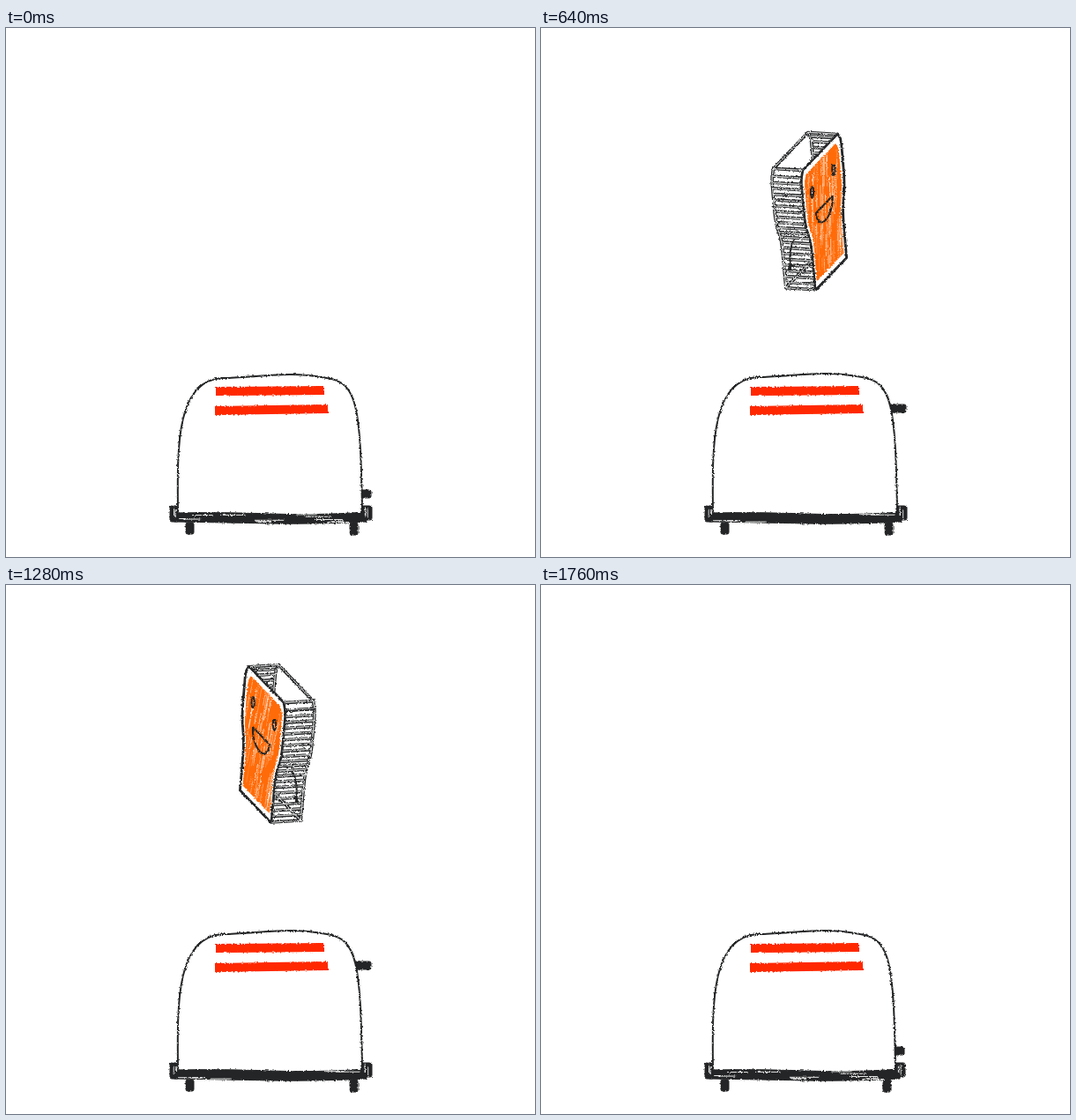
Write an HTML page that moves like this. It is 600 by 600 pixels and loops after 1.92 s.

```html
<!DOCTYPE html>
<html>
<head>
<meta charset="utf-8">
<title>Toaster</title>
<style>
  html, body { margin: 0; width: 100%; height: 100%; overflow: hidden; background: #fff; }
  svg { display: block; width: 100%; height: 100%; }
  path { fill: none; stroke-linecap: round; stroke-linejoin: round; }
  .ink { stroke: #242526; stroke-width: 2; }
  .shell { fill: #fff; }
  .solid { fill: #242526; stroke: #242526; }
  .halo { stroke: #242526; stroke-width: 3.6; }
  .bread { fill: #fff; stroke: #fff; stroke-width: .6; }
  .red { stroke: #ff2800; stroke-linecap: butt; }
  .jam { fill: #ff6b08; stroke: #ff6b08; stroke-width: 1.5; }
  .gap { stroke: #fff; }
</style>
</head>
<body>
<svg viewBox="0 0 600 600">
  <filter id="crayon" filterUnits="userSpaceOnUse" x="0" y="0" width="600" height="600" color-interpolation-filters="sRGB">
    <feTurbulence type="fractalNoise" baseFrequency=".45" numOctaves="2" seed="4"/>
    <feDisplacementMap in="SourceGraphic" scale="3" xChannelSelector="R" yChannelSelector="G"/>
  </filter>
  <clipPath id="aboveSlot"><path d="M0 0H600V431H0Z"/></clipPath>
  <g id="scene" filter="url(#crayon)"></g>
</svg>
<script>
const LOOP = 1920, STEP = 80;
const POP = 480, LAND = 1440, PRESS = 1600;
const { PI, sin, cos, tanh, abs, min, max, sign } = Math;

const range = (count, rule) => Array.from({ length: count }, (_, i) => rule(i));
const path = (d, cls = 'ink', extra = '') => `<path class="${cls}" d="${d}" ${extra}/>`;
const rect = (x, y, w, h) => `<rect class="solid" x="${x}" y="${y}" width="${w}" height="${h}" rx="2"/>`;
const polygon = pts => 'M' + pts.map(p => p.map(n => n.toFixed(1))).join('L') + 'Z';
const rotate = (a, b, angle) => [a * cos(angle) - b * sin(angle), a * sin(angle) + b * cos(angle)];

function randomizer(seed) {
  return () => (seed = seed * 16807 % 2147483647) / 2147483647;
}

// Bread model: u runs right, v down, w out of the jam side
const HALF_HEIGHT = 74, HALF_DEPTH = 18, PITCH = 21 * PI / 180;

function halfWidth(v) {
  const corner = max(0, (-v - 60) / 14);
  return (57 - 7 * tanh((v - 3) / 14)) * (1 - 0.12 * corner ** 2);
}

const rightSide = range(22, i => {
  const v = -HALF_HEIGHT + i * 2 * HALF_HEIGHT / 21;
  return [halfWidth(v), v];
});
const profile = [...rightSide, ...rightSide.map(([u, v]) => [-u, v]).reverse()];

const ellipse = (x, y, rx, ry, sweep = 2 * PI) =>
  range(19, i => [x + rx * cos(i / 18 * sweep), y + ry * sin(i / 18 * sweep)]);
const eyes = [-35, 35].map(x => ellipse(x, -39, 4.5, 6.3));
const smile = ellipse(-2, -11, 27, 19, PI);
const gasp = ellipse(3, 3, 12, 5);

function flight(time) {
  const p = (time - POP) / (LAND - POP);
  return {
    x: 306,
    y: min(425, 117 + 2080 * abs(p - 0.52) ** 3),
    yaw: (360 * p - 10 + 10 * sin(3 * PI * p) + 9 * sin(2 * PI * p)) * PI / 180,
    roll: -7 * sin(1.5 * PI * p) * PI / 180,
    shy: p <= 0,
    cheering: p >= 1
  };
}

function drawToast({ x, y, yaw, roll, shy, cheering }) {
  const depth = (u, w) => w * cos(yaw) - u * sin(yaw);
  const project = (u, v, w) => {
    const across = u * cos(yaw) + w * sin(yaw);
    const [px, py] = rotate(across, v * cos(PITCH) + depth(u, w) * sin(PITCH), roll);
    return [x + px, y + py];
  };
  const facing = sign(cos(yaw)), near = HALF_DEPTH * facing;
  const outline = (shape, w) => polygon(shape.map(([u, v]) => project(u, v, w)));
  const stroke = pts => 'M' + pts.map(p => project(...p)).join('L');

  const crust = profile.map(([u, v], i) => {
    const [u2, v2] = profile[(i + 1) % profile.length];
    return polygon([project(u, v, near), project(u2, v2, near), project(u2, v2, -near), project(u, v, -near)]);
  }).join('');
  const solid = outline(profile, -near) + crust + outline(profile, near);

  const jam = outline(profile.map(([u, v]) => [u * 0.84, v * 0.88]), near);
  const random = randomizer(977);
  const gaps = range(75, () => {
    const u = (random() - 0.5) * 110, v = (random() - 0.6) * 130, length = 10 + random() * 32;
    const width = (0.8 + random() * 2) * max(0.4, abs(cos(yaw)));
    return path(stroke([[u, v, near], [u - length * 0.2, v + length, near]]), 'gap',
      `stroke-width="${width}" opacity="${0.35 + random() * 0.5}"`);
  }).join('');

  // An arm leaves the crust sideways, bends, and ends in three fingers
  const arm = side => {
    const lift = cheering ? -28 : 22;
    const point = (out, v) => [side * (55 + out), v, 0];
    const limb = range(9, i => point(20 * sin(i / 8 * PI / 2), 12 + lift * (i / 8) ** 2));
    const fingers = [-6, 0, 6].map(spread =>
      stroke([point(20, 12 + lift), point(20 + spread, 12 + lift + sign(lift) * (7 - abs(spread) / 3))]));
    return path(stroke(limb) + fingers.join(''));
  };
  const arms = shy ? [] : [-1, 1];
  const isNear = side => depth(side * 60, 0) > 0;

  const corner = w => [facing * halfWidth(-66), -66, w];
  const crease = isNear(facing) ? path(stroke([corner(near), corner(-near)])) : '';
  const face = [...eyes, shy ? gasp : smile].map(shape => path(outline(shape, near))).join('');

  return arms.filter(s => !isNear(s)).map(arm).join('') +
    path(solid, 'halo') + path(solid, 'bread') + path(outline(profile, near)) + crease +
    `<clipPath id="jam">${path(jam)}</clipPath>` + path(jam, 'jam') +
    `<g clip-path="url(#jam)">${gaps}</g>` + (facing > 0 ? face : '') +
    arms.filter(isNear).map(arm).join('');
}

function drawToaster({ left = 195, right = 404, top = 397, slot = 412, lever = 524, widen = 1, worn = 12 }) {
  const body = `M${left} 549C${left - 1} 470 ${left - 1} 400 ${left + 50} ${top}
    C${left + 95} ${top} ${left + 120} ${top - 9} ${right - 40} ${top}
    C${right - 5} ${top + 5} ${right - 2} 430 ${right} 549`;
  const random = randomizer(613 + lever);
  const base = `M${left - 4} 550Q250 549 300 551T${right + 5} 549V560Q350 563 300 562T${left - 4} 560Z`;
  const scratches = range(worn, () =>
    path(`M${left + random() * 180} ${551.5 + random() * 9}h${8 + random() * 26}`, 'gap', 'stroke-width=".9"'));
  const capScratches = [left - 6, right + 3].flatMap(x =>
    range(3, () => path(`M${x + random() * 5} ${544 + random() * 4}v${4 + random() * 7}`, 'gap', 'stroke-width=".8"')));
  const slots = [0, 1].map(i =>
    path(`M${238 - i} ${slot + 22 * i}L${361 + 4 * i} ${slot - 1 + 21 * i}`, 'red', 'stroke-width="10"'));

  return `<g transform="translate(302 575) scale(${widen} ${2 - widen}) translate(-302 -575)">` +
    rect(right - 12, lever, 22, 9) + rect(left - 9, 542, 10, 18) + rect(right - 1, 542, 12, 16) +
    rect(left + 9, 561, 9, 13) + rect(right - 14, 561, 9, 14) +
    path(body, 'ink shell') + slots.join('') + path(base, 'solid') +
    scratches.join('') + capScratches.join('') + '</g>';
}

function toasterAt(time) {
  if (time < 160) return {};
  if (time < POP) return { widen: 1.06 };
  if (time < POP + STEP) return { left: 202, right: 398, top: 393, slot: 405, lever: 422 };
  if (time < PRESS) return { top: 396, lever: 427, worn: 5 };
  if (time < PRESS + STEP) return { widen: 1.05 };
  return { right: 402, top: 396 };
}

function draw(time) {
  const toaster = drawToaster(toasterAt(time));
  if (time < POP || time >= PRESS) return toaster;
  const toast = drawToast(flight(time));
  if (time > POP && time <= LAND) return toaster + toast;
  return `${toaster}<g clip-path="url(#aboveSlot)">${toast}</g>` + path('M247 432L350 430', 'red', 'stroke-width="2"');
}

const scene = document.getElementById('scene');
let shown = -1;
function render() {
  const time = Math.floor(performance.now() % LOOP / STEP) * STEP;
  if (time !== shown) scene.innerHTML = draw(shown = time);
  requestAnimationFrame(render);
}
render();
</script>
</body>
</html>
```
